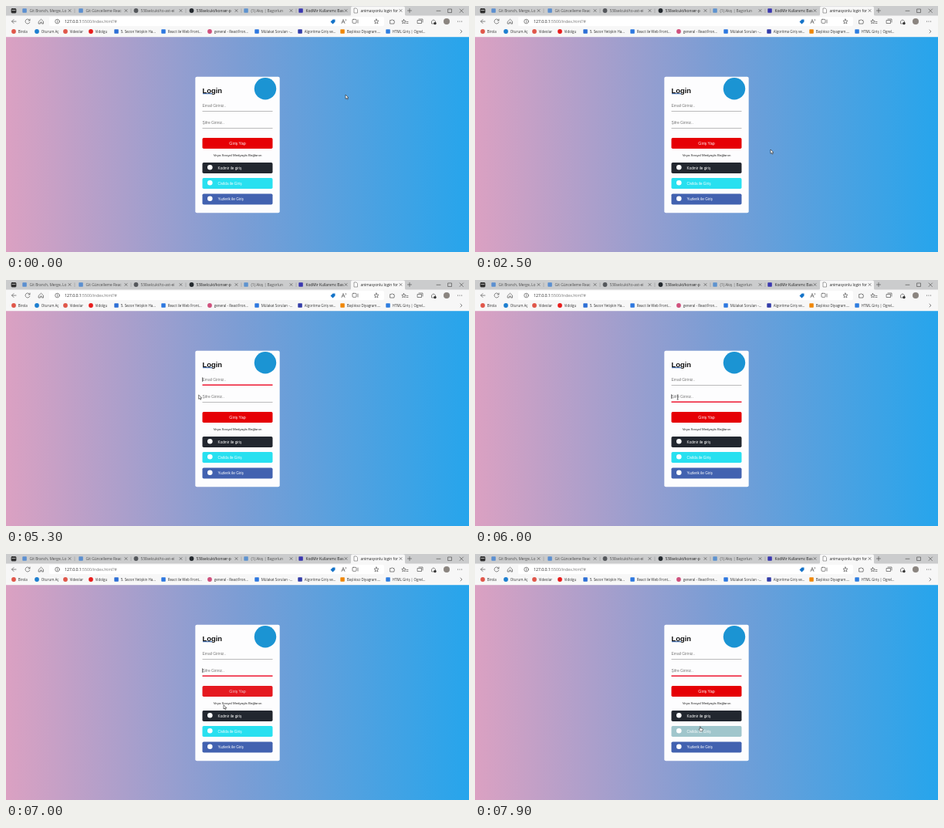
Write an HTML page that moves like this. It is 600 px wide and 319 px high and loops after 8 s.

```html
<!DOCTYPE html>
<html lang="tr">
<head>
<meta charset="utf-8">
<title>Login</title>
<style>
  html, body { margin: 0; width: 100%; height: 100%; overflow: hidden; }
  svg { display: block; width: 100vw; height: 100vh; }
  text { font-family: "Open Sans", sans-serif; white-space: pre; }
  .card text { font-family: "Liberation Sans", Arial, sans-serif; }
  .line { fill: none; stroke: #555; stroke-width: .7; stroke-linecap: round; stroke-linejoin: round; }
</style>
</head>
<body>
<svg viewBox="0 0 600 319" preserveAspectRatio="none">
  <defs>
    <linearGradient id="sky">
      <stop offset="0" stop-color="#dba1c2"/>
      <stop offset=".5" stop-color="#7d9dd4"/>
      <stop offset="1" stop-color="#26a5ec"/>
    </linearGradient>
  </defs>
  <rect y="40" width="600" height="279" fill="url(#sky)"/>

  <rect width="600" height="13" fill="#cbcccd"/>
  <rect y="12.5" width="600" height="27.7" fill="#f7f7f7"/>
  <path d="M445 13q2 0 2-2V2.5q0-2 2-2h66q2 0 2 2V11q0 2 2 2z" fill="#f7f7f7"/>
  <rect x="56" y="14" width="434" height="12" rx="2" fill="#fff"/>
  <g id="tabs"></g>
  <g id="marks"></g>

  <g class="line">
    <rect x="7" y="3.5" width="6" height="5.5" rx="1" fill="#333" stroke="#222"/>
    <path d="M8 5.5h4" stroke="#ddd"/>
    <path d="M520.5 6h5M523 3.5v5M558 6.3h5M573 4h4.5v4.5h-4.5zM588 4l4.5 4.5M592.5 4l-4.5 4.5"/>
    <path d="M13 20H7.5l2.5-2.5M7.5 20l2.5 2.5"/>
    <path d="M30.7 18.5a3 3 0 1 0 .2 2.5M31 17v2h-2"/>
    <path d="M42.5 20l3-2.8 3 2.8v3h-2v-2h-2v2h-2z"/>
    <circle cx="66.5" cy="20" r="2.8"/><path d="M66.5 19.8v1.5M66.5 18.4v.1"/>
    <path d="M435 22.5l2-5 2 5M435.8 20.8h2.5M440.3 17.2q1 1 0 2"/>
    <rect x="449" y="17.3" width="5" height="5" rx="1"/><path d="M456 18v4"/>
    <path d="M480 17l.9 2 2.1.2-1.6 1.4.5 2.2-1.9-1.1-1.9 1.1.5-2.2-1.6-1.4 2.1-.2z"/>
    <path d="M498 18.5h1.5q.8-2 1.6 0h1.8v1.6q2 .7 0 1.5v1.4H498z"/>
    <path d="M515.5 17.5l.8 1.8 1.9.2-1.4 1.3.4 1.9-1.7-1-1.7 1 .4-1.9-1.4-1.3 1.9-.2zM519 20.5h2M519 22.5h2"/>
    <path d="M533.5 18.5h5v4h-5zM535 17h5v4"/>
    <path d="M551.5 22.5v-2.5q2.5-4 5 0v2.5z"/>
    <path d="M588 20h.1M590.5 20h.1M585.5 20h.1" stroke-width="1.1"/>
    <path d="M589 31l2 2-2 2"/>
  </g>
  <path d="M420.5 20.5l3-3h3v3l-3 3z" fill="#1473c8"/>
  <circle cx="571" cy="20" r="4" fill="#8b8580"/>
  <circle cx="556" cy="22.5" r="1.7" fill="#333"/>
  <text x="76" y="22" font-size="5.15" fill="#222">127.0.0.1<tspan fill="#777">:5500/index.html?#</tspan></text>

  <g class="card">
    <rect x="245.3" y="91.7" width="109.4" height="176.6" rx="2" fill="#fdfdfe"/>
    <text x="254.5" y="112.8" font-size="9.4" font-weight="bold" fill="#111">Login</text>
    <rect x="255" y="113.2" width="12" height="1" fill="#24559f"/>
    <circle cx="336" cy="107.3" r="14.2" fill="#1b94d3"/>
    <g id="fields"></g>
    <text x="300" y="195.2" font-size="4.4" fill="#222" text-anchor="middle">Veya Sosyal Medyayla Bağlanın</text>
    <g id="buttons"></g>
  </g>
  <rect id="caret" x="254.4" width=".7" height="5.6" fill="#222"/>

  <g id="cursor" stroke-linejoin="round">
    <path id="arrow" d="M0 0v5.4l1.3-1.1.9 1.9 1-.5-.9-1.8h1.6z" fill="#fff" stroke="#222" stroke-width=".6"/>
    <path id="beam" d="M-1-3h2M0-3v6M-1 3h2" fill="none" stroke="#222" stroke-width=".6"/>
    <path id="hand" d="M0 .4q.5-.8 1 0v2l2.4.5q.7.2.6 1l-.5 2.3H.3L-1.2 4q0-.8.7-.5l.5.4z" fill="#fff" stroke="#222" stroke-width=".55"/>
  </g>
</svg>
<script>
const LOOP = 8000;
const $ = id => document.getElementById(id);

function add(parent, tag, attrs, label) {
  const el = document.createElementNS('http://www.w3.org/2000/svg', tag);
  for (const k in attrs) el.setAttribute(k, attrs[k]);
  if (label) el.textContent = label;
  return parent.appendChild(el);
}

// icon x, icon colour, label
const tabs = [
  [24, '#5b8fd0', 'Git Branch, Merge, Lo'],
  [97, '#5b8fd0', 'Git Güncelleme Reac'],
  [168, '#55585c', '538selcukt/to-ast-ei'],
  [240, '#24292e', '538selcukt/konser-p'],
  [311, '#5e93cf', '(1) Akış | Bagorlun'],
  [382, '#3a37b0', 'KodMir Kullanımı: Bas'],
  [453, '#fff', 'animasyonlu login for']
];
tabs.forEach(([x, color, label], i) => {
  const g = $('tabs');
  if (i === 6) add(g, 'path', { d: 'M451 3h3l1.500 1.500v4.500h-4.500z', fill: color, stroke: '#666', 'stroke-width': .6 });
  else if (i === 2 || i === 3) add(g, 'circle', { cx: x + .5, cy: 6, r: 2.9, fill: color });
  else add(g, 'rect', { x: x - 2.7, y: 3.3, width: 5.5, height: 5.5, rx: .8, fill: color });
  add(g, 'text', { x: x + 6.5, y: 8, 'font-size': 4.8, fill: i === 3 || i > 4 ? '#222' : '#505050' }, label);
  add(g, 'path', { class: 'line', d: `M${x + 57} 4.500l3 3m0-3l-3 3` });
  if (i < 5) add(g, 'path', { d: `M${x + 65} 3.500v5.500`, stroke: '#999', 'stroke-width': .6 });
});

const marks = [
  [10, '#e0574a', 'Birola'],
  [40, '#1d7fd0', 'Oturum Aç'],
  [77, '#e0574a', 'Videolar'],
  [110, '#e81c1c', 'Vidolgu'],
  [143, '#2d6fd6', '5. Sezon Yetişkin Ha...'],
  [204, '#2d78e0', 'React ile Web Front...'],
  [264, '#d0517d', 'general - ReactFron...'],
  [325, '#2d78e0', 'Mülakat Soruları -...'],
  [381, '#333ca8', 'Algoritma Giriş ve...'],
  [436, '#f08705', 'Başlıksız Diyagram....'],
  [495, '#2e7de0', 'HTML Giriş | Ogrel...']
];
marks.forEach(([x, color, label], i) => {
  const g = $('marks');
  if (i < 4 || i === 6) add(g, 'circle', { cx: x, cy: 33, r: 2.9, fill: color });
  else add(g, 'rect', { x: x - 2.7, y: 30.2, width: 5.5, height: 5.5, rx: .7, fill: color });
  add(g, 'text', { x: x + 5.7, y: 34.8, 'font-size': 4.5, fill: '#333' }, label);
});

const fields = [
  { y: 136, label: 'Email Giriniz..', from: 5100, to: 6000 },
  { y: 158, label: 'Şifre Giriniz..', from: 6000, to: LOOP }
];
for (const f of fields) {
  add($('fields'), 'text', { x: 254.5, y: f.y - 5, 'font-size': 4.95, fill: '#777' }, f.label);
  f.line = add($('fields'), 'rect', { x: 254.5, width: 91 });
}

// colour pairs are [rest, hover]
const buttons = [
  { y: 171, label: 'Giriş Yap', bg: ['#e60005', '#e26270'], ink: ['#ffffff', '#bd2c3c'], from: 6400, to: 6850 },
  { y: 203, label: 'Kodmir ile giriş', bg: ['#22272f', '#606b75'], from: 7100, to: 7600 },
  { y: 223, label: 'Civilda ile Giriş', bg: ['#28e0f0', '#a0c6cc'], from: 7700, to: LOOP },
  { y: 243.5, label: 'Yuzlerik ile Giriş', bg: ['#4262b0', '#4262b0'], from: LOOP, to: LOOP }
];
buttons.forEach((b, i) => {
  b.box = add($('buttons'), 'rect', { x: 254.5, y: b.y, width: 91, height: 14, rx: 1.8 });
  b.text = add($('buttons'), 'text', i
    ? { x: 274.5, y: b.y + 8.7, 'font-size': 4.7, fill: '#fff' }
    : { x: 300, y: b.y + 8.8, 'font-size': 5.3, 'text-anchor': 'middle' }, b.label);
  if (i) add($('buttons'), 'circle', { cx: 264.3, cy: b.y + 6.2, r: 3.3, fill: '#fff' });
});

// pointer tip: time, x, y
const path = [
  [0, 440, 115], [100, 438, 118], [400, 430, 129], [700, 386, 183], [2500, 383, 186],
  [3000, 377, 177], [3300, 366, 160], [3800, 351, 137], [4300, 337, 117], [4400, 336, 117],
  [4700, 325, 119], [5000, 264, 129], [5100, 261, 130], [5300, 249.7, 149], [5500, 251, 151],
  [5800, 262, 152], [6100, 263, 152], [6400, 266, 172], [6600, 267.5, 176], [6800, 272, 181],
  [7100, 287, 203], [7300, 289.5, 206.5], [7500, 290, 213], [7700, 291, 223], [7900, 291.3, 223.5]
];
const jumps = [0, 100, 400, 500, 600, 700, 2500, 2800, 3000, 3300, 3800, 4300, 4400, 4700];

const clamp = v => Math.max(0, Math.min(1, v));

function snap(t) {
  if (t >= 4800) return t >= 7900 ? 7900 : Math.min(7700, Math.floor(t / 100) * 100);
  return jumps.findLast(j => j <= t);
}

function pointer(t) {
  const i = path.findLastIndex(p => p[0] <= t);
  const a = path[i], b = path[i + 1] || a;
  const k = b === a ? 0 : (t - a[0]) / (b[0] - a[0]);
  return [a[1] + (b[1] - a[1]) * k, a[2] + (b[2] - a[2]) * k];
}

function mix([a, b], k) {
  const part = (c, i) => parseInt(c.slice(i, i + 2), 16);
  return `rgb(${[1, 3, 5].map(i => Math.round(part(a, i) + (part(b, i) - part(a, i)) * k))})`;
}

function draw(now) {
  const t = now % LOOP, q = snap(t);
  const [x, y] = pointer(q);
  const inRow = (top, h) => x > 254 && x < 346 && y >= top && y < top + h;
  const onField = fields.some(f => inRow(f.y - 14, 14));
  const onButton = buttons.some(b => inRow(b.y, 14)) || Math.hypot(x - 336, y - 107.3) < 14.2;
  const shape = onButton ? 'hand' : onField ? 'beam' : 'arrow';
  for (const id of ['arrow', 'beam', 'hand']) $(id).style.display = id === shape ? '' : 'none';
  $('cursor').setAttribute('transform', `translate(${x} ${y})`);

  let caretY = -20;
  for (const f of fields) {
    const active = q >= f.from && q < f.to;
    f.line.setAttribute('y', active ? f.y - .6 : f.y);
    f.line.setAttribute('height', active ? 1.5 : .8);
    f.line.setAttribute('fill', active ? '#ee1730' : '#aaa');
    if (active && (q - f.from) % 1000 < 500) caretY = f.y - 9.7;
  }
  $('caret').setAttribute('y', caretY);

  for (const b of buttons) {
    const k = clamp((q - b.from) / 200) * clamp(1 - (q - b.to) / 200);
    b.box.setAttribute('fill', mix(b.bg, k));
    if (b.ink) b.text.setAttribute('fill', mix(b.ink, k));
  }
}

let start;
function tick(now) {
  start ??= now;
  draw(Math.max(0, now - start));
  requestAnimationFrame(tick);
}
draw(0);
requestAnimationFrame(tick);
</script>
</body>
</html>
```
